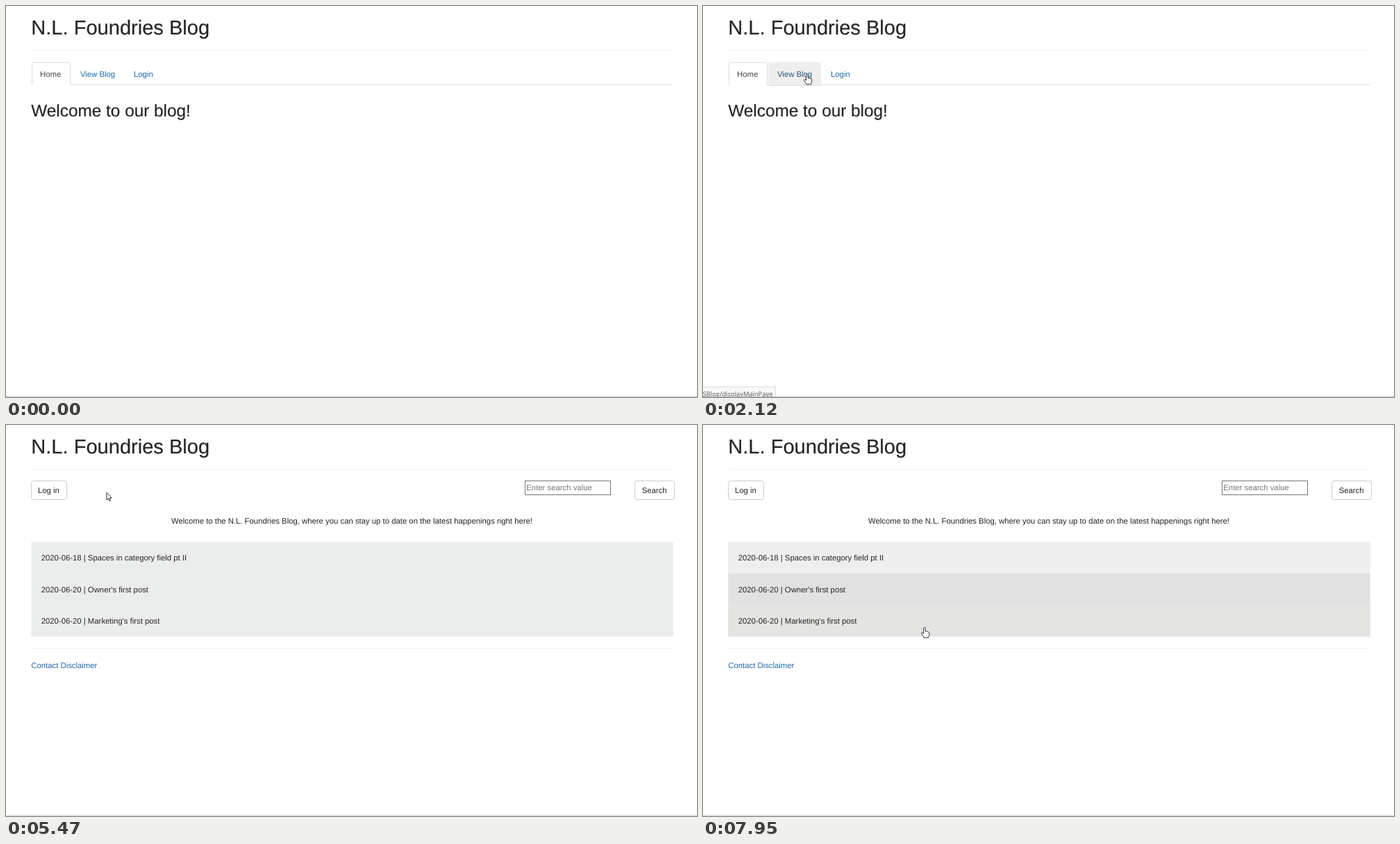
An HTML page that plays this animation: 995x563 px, repeating every 8000 ms.

```html
<!DOCTYPE html>
<html lang="en">
<head>
<meta charset="utf-8">
<title>Blog</title>
<style>
html, body { margin: 0; width: 100%; height: 100%; overflow: hidden; background: #fff; }
svg { display: block; }
text { font: 11.33px "Liberation Sans", Arial, sans-serif; fill: #262626; text-rendering: geometricPrecision; }
.h1 { font-size: 29.07px; stroke: #262626; stroke-width: .2; }
.h2 { font-size: 24.35px; stroke: #262626; stroke-width: .2; }
.link { fill: #2269ab; }
.link.on { fill: #23527c; }
.hint { fill: #777; }
.url { font: 9.33px "Open Sans", "Noto Sans", sans-serif; fill: #555; }
.box { fill: #fff; stroke: #ccc; }
.cursor { fill: #fff; stroke: #222; stroke-width: .95; stroke-linejoin: round; }
</style>
</head>
<body>
<svg width="995" height="563" viewBox="0 0 995 563">
  <text class="h1" x="36.3" y="41">N.L. Foundries Blog</text>
  <path d="M37 64H960" stroke="#eee"/>

  <g id="home">
    <path d="M37 113.5H960" stroke="#ddd"/>
    <path d="M37.5 114.5V84.5Q37.5 81.5 40.5 81.5H89.5Q92.5 81.5 92.5 84.5V114.5" fill="#fff"/>
    <path d="M37.5 114V84.5Q37.5 81.5 40.5 81.5H89.5Q92.5 81.5 92.5 84.5V114" fill="none" stroke="#ddd"/>
    <path id="viewBg" d="M94 115V84Q94 81 97 81H167Q170 81 170 84V115Z" fill="#eee"/>
    <path id="loginBg" d="M172 115V84Q172 81 175 81H222Q225 81 225 84V115Z" fill="#eee"/>
    <path id="hoverLine" stroke="#ddd"/>
    <text x="49.1" y="102" style="fill:#444">Home</text>
    <text id="view" class="link" x="107" y="102">View Blog</text>
    <text id="login" class="link" x="184" y="102">Login</text>
    <text class="h2" x="36.3" y="159">Welcome to our blog!</text>
  </g>

  <g id="blog">
    <rect class="box" x="36.5" y="80.5" width="51" height="27" rx="3"/>
    <text x="46" y="98">Log in</text>
    <rect class="box" x="747.5" y="80.5" width="123" height="20" style="stroke:#777"/>
    <text class="hint" x="749.3" y="94">Enter search value</text>
    <rect class="box" x="905.5" y="80.5" width="57" height="27" rx="3"/>
    <text x="915.7" y="98">Search</text>
    <text x="498" y="142" text-anchor="middle">Welcome to the N.L. Foundries Blog, where you can stay up to date on the latest happenings right here!</text>
    <rect x="36.3" y="168.5" width="924.4" height="136.2" fill="#ebedec"/>
    <g id="rows"></g>
    <text x="50.7" y="195">2020-06-18 | Spaces in category field pt II</text>
    <text x="50.7" y="240.5">2020-06-20 | Owner's first post</text>
    <text x="50.7" y="286">2020-06-20 | Marketing's first post</text>
    <path d="M37 321.5H960" stroke="#eee"/>
    <text class="link" x="36.3" y="349.5">Contact Disclaimer</text>
  </g>

  <g id="status">
    <rect id="statusBox" x="-1" y="548.5" height="20" fill="#f8f8f8" stroke="#ddd"/>
    <text id="url" class="url" x="-.3" y="561.5">SBlog/displayMainPage</text>
  </g>
  <path d="M0 562.5H995" stroke="#ccc"/>

  <circle id="click" cx="144.4" cy="97" r="10" fill="#ff0" opacity=".47"/>
  <path id="arrow" class="cursor" d="M.3.3V10.8L2.8 8.6L4.3 12.3L6 11.6L4.4 8H7.8Z"/>
  <path id="hand" class="cursor" d="M-1.3 9V1.3Q-1.3 0 0 0T1.3 1.3V5.5Q2.5 4.8 3.5 6Q4.9 5.3 5.5 6.6Q7 6.2 7 8V10.5Q7 12 5.8 13.2V14.6H-.8V13.6Q-2 12.6-4.3 9Q-4.7 7.4-3 7.4Q-2 7.8-1.3 9Z"/>
</svg>
<script>
const LOOP = 8000, PAGE = 5470, ROW = 45.4, ROWS_TOP = 168.5;
const $ = id => document.getElementById(id);
const show = (id, on) => $(id).style.display = on ? '' : 'none';
const clamp = u => Math.max(0, Math.min(1, u));
const easeOut = u => 1 - (1 - u) ** 2;
const smooth = u => u * u * (3 - 2 * u);

// The pointer is sampled in even steps: start, end, steps, from, to, easing
const moves = [
  [280, 500, 4, [886, 551], [460, 338], easeOut],
  [900, 1660, 11, [452, 331], [184, 108], smooth],
  [1740, 2290, 8, [172.6, 104], [144.6, 97], easeOut],
  [7260, 7950, 10, [146.2, 104], [318.8, 291.5], smooth]
];

const rows = [7567, 7720, 7797].map((start, i) => {
  const el = document.createElementNS('http://www.w3.org/2000/svg', 'rect');
  const attrs = { x: 36.3, y: ROWS_TOP + i * ROW, width: 924.4, height: ROW };
  for (const k in attrs) el.setAttribute(k, attrs[k]);
  $('rows').append(el);
  return { el, start };
});

function pointer(t) {
  const move = moves.filter(m => t >= m[0]).pop();
  if (!move) return null;
  const [start, end, steps, from, to, ease] = move;
  const k = Math.floor((t - start) / (end - start) * (steps - 1) + 1e-6);
  const u = ease(Math.min(1, k / (steps - 1)));
  return from.map((v, i) => v + (to[i] - v) * u);
}

function draw(t) {
  const blog = t >= PAGE;
  const p = pointer(t);
  const [x, y] = p || [-99, -99];
  const inTabs = !blog && y > 81 && y < 115;
  const overView = inTabs && x > 94 && x < 171;
  const overLogin = inTabs && x >= 171 && x < 225;
  const overRow = blog && y > ROWS_TOP && y < ROWS_TOP + 3 * ROW;

  show('home', !blog);
  show('blog', blog);
  show('viewBg', overView);
  show('loginBg', overLogin);
  show('hoverLine', overView || overLogin);
  $('hoverLine').setAttribute('d', overView ? 'M94 114.5H170' : 'M172 114.5H225');
  $('view').classList.toggle('on', overView);
  $('login').classList.toggle('on', overLogin);

  const loading = t >= 5380;
  show('status', t >= 1975 && !blog);
  show('url', !loading);
  $('statusBox').setAttribute('width', loading ? 90.5 : 105.5);

  rows.forEach(({ el, start }, i) => {
    el.style.fill = i == 2 ? '#e4e4e2' : i == 0 && t >= 7720 ? '#eee' : '#e1e1e1';
    el.style.opacity = clamp((t - start) / 75);
  });

  const isHand = overRow || (!loading && (overView || overLogin));
  show('click', t >= 2430 && t < 2670);
  show('hand', p && isHand);
  show('arrow', p && !isHand);
  $(isHand ? 'hand' : 'arrow').setAttribute('transform', `translate(${x} ${y})`);
}

const begin = performance.now();
function tick() {
  draw((performance.now() - begin) % LOOP);
  requestAnimationFrame(tick);
}
tick();
</script>
</body>
</html>
```
